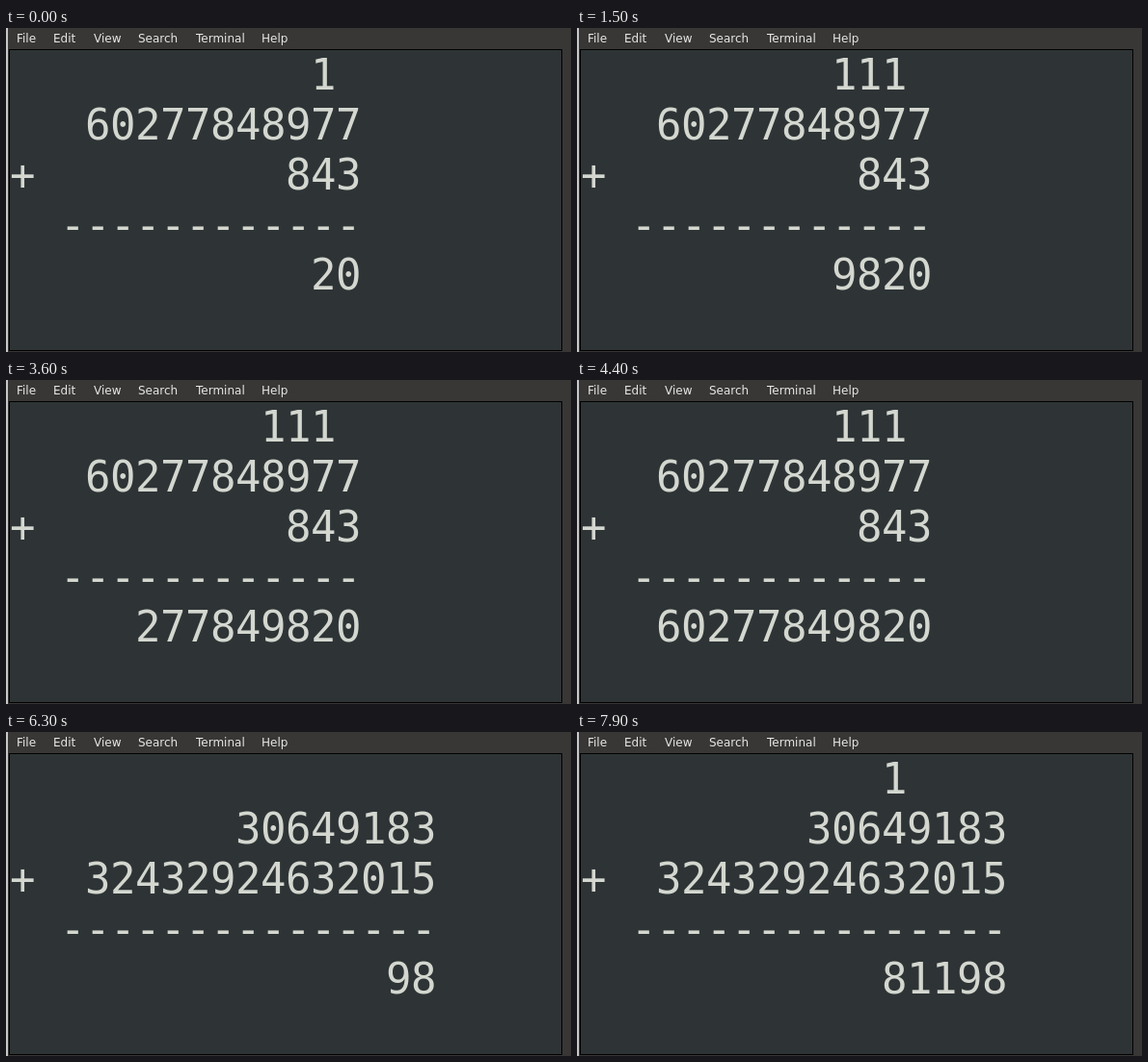
An HTML page with a canvas that plays this animation: 586x337 px, repeating every 8 s.

```html
<!DOCTYPE html>
<html lang="en">
<head>
<meta charset="utf-8">
<title>Column addition in a terminal</title>
<style>
  html, body { margin: 0; width: 100%; height: 100%; overflow: hidden; background: #383735; }
  canvas { display: block; }
</style>
</head>
<body>
<canvas id="stage" width="586" height="337"></canvas>
<script>
const ctx = document.getElementById('stage').getContext('2d');
const LOOP = 8000;
const CELL = { width: 26, height: 52, left: 4, baseline: 64 };
const MENU = { File: 11, Edit: 49, View: 91, Search: 137, Terminal: 197, Help: 265 };

// Each sum starts with `done` steps already written; every time in `ticks` adds one more.
const sums = [
  { start: 0, done: 3, top: '60277848977', bottom: '843',
    ticks: [300, 700, 1100, 1500, 1900, 2300, 2900, 3200, 3600, 4000, 4400] },
  { start: 5500, done: 0, top: '30649183', bottom: '32432924632015',
    ticks: [5800, 6300, 6700, 7100, 7400, 7900] }
];

// Work from the right: write a digit, then any carry above the next column.
function additionSteps(top, bottom, lastColumn) {
  const length = Math.max(top.length, bottom.length);
  const steps = [];
  let carry = 0;
  for (let i = 0; i < length; i++) {
    const total = Number(top.at(-1 - i) || 0) + Number(bottom.at(-1 - i) || 0) + carry;
    carry = total > 9 ? 1 : 0;
    steps.push({ char: String(total % 10), column: lastColumn - i, row: 4 });
    if (carry) steps.push({ char: '1', column: lastColumn - i - 1, row: 0 });
  }
  return steps;
}

for (const sum of sums) {
  sum.lastColumn = 2 + Math.max(sum.top.length, sum.bottom.length);
  sum.steps = additionSteps(sum.top, sum.bottom, sum.lastColumn);
}

function rect(color, x, y, width, height) {
  ctx.fillStyle = color;
  ctx.fillRect(x, y, width, height);
}

function drawChar(char, column, row) {
  ctx.fillText(char, CELL.left + column * CELL.width, CELL.baseline + row * CELL.height);
}

function drawRightAligned(text, lastColumn, row) {
  [...text].forEach((char, i) => drawChar(char, lastColumn - text.length + 1 + i, row));
}

function drawWindow() {
  rect('#383735', 0, 0, 586, 337);
  rect('#c8c8c8', 0, 0, 2, 337);
  rect('#000', 3, 22, 574, 314);
  rect('#2e3436', 4, 23, 572, 312);
  ctx.font = '12px "DejaVu Sans", sans-serif';
  ctx.fillStyle = '#e6e6e6';
  for (const [label, x] of Object.entries(MENU)) ctx.fillText(label, x, 15);
}

function draw(time) {
  const sum = sums.findLast(s => time >= s.start);
  const count = sum.done + sum.ticks.filter(t => time >= t).length;
  drawWindow();
  ctx.font = '44px "DejaVu Sans Mono", monospace';
  ctx.fillStyle = '#d3d7cf';
  drawRightAligned(sum.top, sum.lastColumn, 1);
  drawChar('+', 0, 2);
  drawRightAligned(sum.bottom, sum.lastColumn, 2);
  drawRightAligned('-'.repeat(sum.lastColumn - 1), sum.lastColumn, 3);
  for (const { char, column, row } of sum.steps.slice(0, count)) drawChar(char, column, row);
}

const begin = performance.now();
function tick() {
  draw((performance.now() - begin) % LOOP);
  requestAnimationFrame(tick);
}
tick();
</script>
</body>
</html>
```
